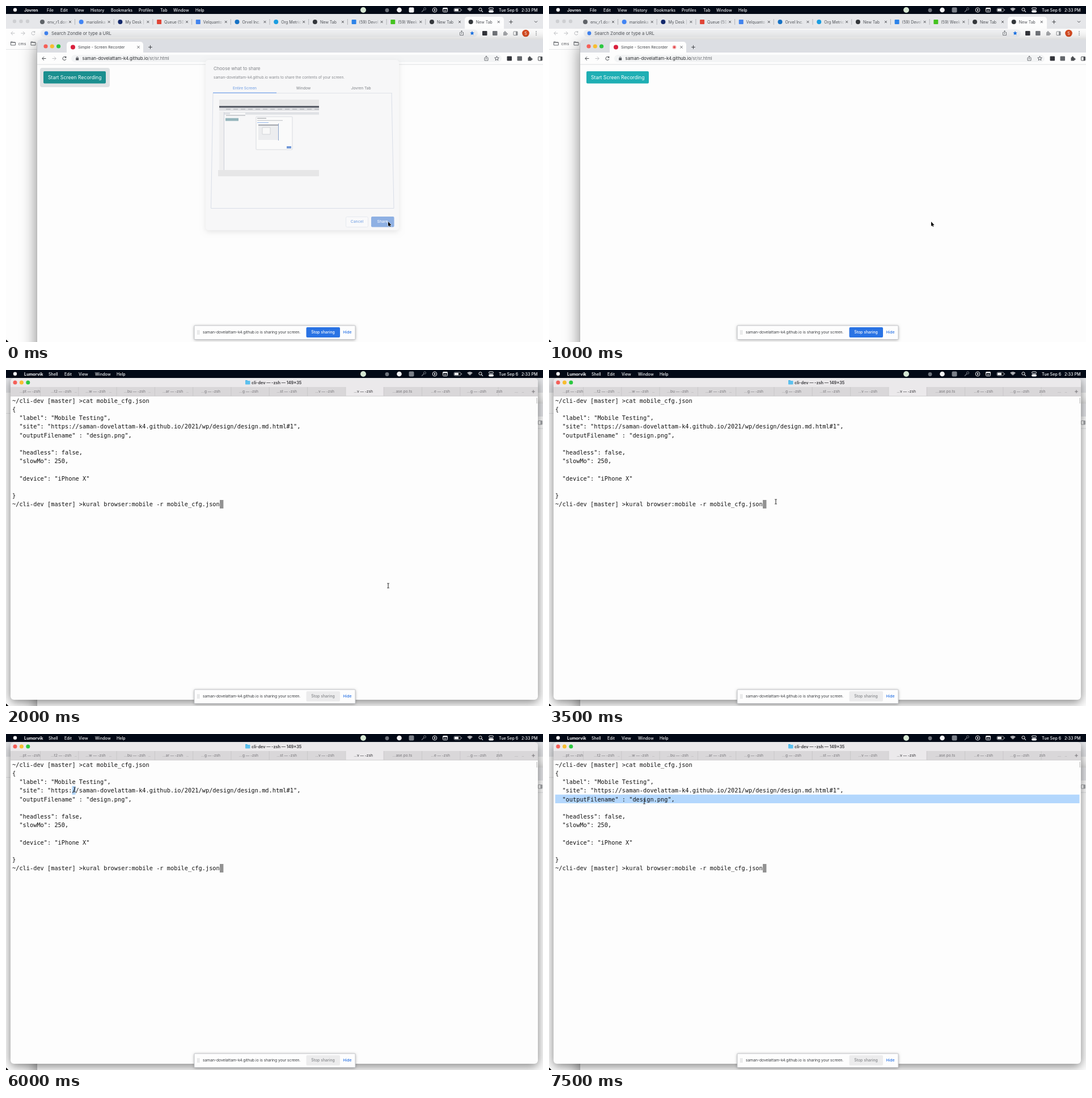
Recreate the animation shown at these times as an HTML page with a canvas. Size 947 by 592 pixels, loop 8000 ms.

```html
<!DOCTYPE html>
<html lang="en">
<head>
<meta charset="utf-8">
<title>Screen share</title>
<style>
html, body { margin: 0; width: 100%; height: 100%; overflow: hidden; background: #fdfdfd; }
canvas { display: block; width: 947px; height: 592px; }
</style>
</head>
<body>
<canvas id="stage"></canvas>
<script>
const W = 947, H = 592, LOOP = 8000, STEP = 500;
const UI = 'Inter, Roboto, sans-serif';
const MONO = '"DejaVu Sans Mono", "Liberation Mono", monospace';
const HOST = 'saman-dovelattam-k4.github.io';
const canvas = document.getElementById('stage');
const c = canvas.getContext('2d');
const dpr = window.devicePixelRatio || 1;
canvas.width = W * dpr;
canvas.height = H * dpr;

function box(x, y, w, h, fill, r = 0, stroke) {
  c.beginPath();
  c.roundRect(x, y, w, h, r);
  if (fill) { c.fillStyle = fill; c.fill(); }
  if (stroke) { c.strokeStyle = stroke; c.lineWidth = 1; c.stroke(); }
}
function dot(x, y, r, fill) {
  c.beginPath();
  c.arc(x, y, r, 0, Math.PI * 2);
  c.fillStyle = fill;
  c.fill();
}
function line(points, color, w = 1) {
  c.beginPath();
  for (let i = 0; i < points.length; i += 2) c.lineTo(points[i], points[i + 1]);
  c.strokeStyle = color;
  c.lineWidth = w;
  c.stroke();
}
function arc(x, y, r, a, b, color, w = 1) {
  c.beginPath();
  c.arc(x, y, r, a, b);
  c.strokeStyle = color;
  c.lineWidth = w;
  c.stroke();
}
// y is the vertical middle of the capitals
function text(s, x, y, size, color, weight = 400, align = 'left', family = UI) {
  c.font = `${weight} ${size}px ${family}`;
  c.textAlign = align;
  c.fillStyle = color;
  c.fillText(s, x, y + size * 0.36);
  return c.measureText(s).width;
}
function shadowed(blur, dy, color, draw) {
  c.save();
  c.shadowBlur = blur * dpr;
  c.shadowOffsetY = dy * dpr;
  c.shadowColor = color;
  draw();
  c.restore();
}

function cross(x, y, color = '#44474b') {
  line([x - 2, y - 2, x + 2, y + 2], color, 0.9);
  line([x + 2, y - 2, x - 2, y + 2], color, 0.9);
}
function plus(x, y, color = '#44474b', r = 3.3) {
  line([x - r, y, x + r, y], color, 1);
  line([x, y - r, x, y + r], color, 1);
}
function folder(x, y, color) {
  line([x - 4, y + 3, x - 4, y - 3, x - 1, y - 3, x, y - 2, x + 4, y - 2, x + 4, y + 3, x - 4, y + 3], color, 1);
  line([x - 4, y - 1.7, x + 4, y - 1.7], color, 1);
}
function star(x, y, color, solid) {
  c.beginPath();
  for (let i = 0; i < 10; i++) {
    const a = -Math.PI / 2 + i * Math.PI / 5, r = i % 2 ? 1.8 : 4;
    c.lineTo(x + r * Math.cos(a), y + r * Math.sin(a));
  }
  c.closePath();
  c.lineWidth = 0.9;
  c.fillStyle = c.strokeStyle = color;
  solid ? c.fill() : c.stroke();
}
function upload(x, y, color) {
  line([x - 1.5, y - 1, x - 3, y - 1, x - 3, y + 4, x + 3, y + 4, x + 3, y - 1, x + 1.5, y - 1], color, 0.8);
  line([x, y + 2, x, y - 4], color, 0.8);
  line([x - 1.6, y - 2.4, x, y - 4, x + 1.6, y - 2.4], color, 0.8);
}
function puzzle(x, y, color) {
  box(x - 3.5, y - 2, 6, 6, color, 0.6);
  dot(x - 0.5, y - 2.5, 1.5, color);
  dot(x + 3, y + 1, 1.5, color);
}
function panel(x, y, color) {
  box(x - 3.5, y - 3, 7, 6.5, null, 0.5, color);
  box(x + 0.5, y - 3, 3, 6.5, color);
}
function navArrows(x, y, back, next) {
  line([x + 3.5, y, x - 3.2, y], back, 1);
  line([x, y - 3.2, x - 3.2, y, x, y + 3.2], back, 1);
  line([x + 14.5, y, x + 21.2, y], next, 1);
  line([x + 18, y - 3.2, x + 21.2, y, x + 18, y + 3.2], next, 1);
  arc(x + 36, y, 3, 0.3, 5.4, back, 1);
  box(x + 37, y - 3.5, 2.4, 2.4, back);
}

const MENUS = {
  browser: [['Jovren', 32], ['File', 72], ['Edit', 96], ['View', 121], ['History', 149], ['Bookmarks', 185],
    ['Profiles', 234], ['Tab', 272], ['Window', 295], ['Help', 334]],
  shell: [['Lumorvik', 32], ['Shell', 75], ['Edit', 103], ['View', 128], ['Window', 157], ['Help', 195]]
};
function menuBar(kind, bright) {
  const w = '#f4f4f6';
  box(0, 0, W, 14, '#020916');
  dot(16, 6.8, 3.2, w);
  MENUS[kind].forEach(([s, x], i) => text(s, x, 7, i ? 7.1 : 7.3, w, i ? 500 : 700));
  dot(630, 7, 5, '#d5e6d3');
  dot(672, 7.5, 3.4, '#6d727b');
  dot(693.5, 7, 4.3, w);
  box(710.5, 2.5, 9, 9, bright ? w : '#7b8089', 2);
  arc(738.5, 5, 2, 0, 7, '#70757e', 1);
  line([737, 6.5, 733, 10.5], '#70757e', 1.2);
  arc(756, 7, 3.8, 0, 7, w, 1);
  c.beginPath(); c.moveTo(755, 5); c.lineTo(758, 7); c.lineTo(755, 9); c.fillStyle = w; c.fill();
  box(770.5, 3.5, 8, 7, null, 1, w);
  box(770.5, 3.5, 8, 2, w);
  line([772, 8, 777, 8], w, 1);
  box(790, 4, 12, 6, null, 1.7, '#9a9da3');
  box(791, 5, 7, 4, w, 0.8);
  box(803, 6, 1, 2, '#9a9da3');
  for (const r of [2.2, 4.3, 6.4]) arc(818, 10.2, r, -2.3, -0.84, w, 1.3);
  arc(836.5, 6.2, 2.6, 0, 7, w, 1);
  line([838.5, 8.2, 841, 10.7], w, 1.1);
  box(851.5, 3, 8, 3.2, null, 1.6, w);
  box(851, 7.5, 9, 4, w, 2);
  text('Tue Sep 6\u2002 2:33 PM', 869, 7, 7.2, w, 500);
}

const TABS = [['env_r1.dom', '#5f6368'], ['mariolinka', '#4285f4'], ['My Desk |', '#13286b'], ['Queue (50)', '#e04436', 1],
  ['Velquanto', '#4384ee', 1], ['Orvel Inc.', '#1672c4'], ['Org Metrics', '#1a9de0'], ['New Tab', '#34373b'],
  ['(59) Devel', '#2d83e8', 1], ['(59) Week', '#45c321', 1], ['New Tab', '#34373b'], ['New Tab', '#34373b']];
function fadeText(s, x, y) {
  const g = c.createLinearGradient(x + 25, 0, x + 37, 0);
  g.addColorStop(0, '#505358');
  g.addColorStop(1, '#50535800');
  text(s, x, y, 7, s === 'New Tab' ? '#505358' : g);
}
function backWindow() {
  const grey = '#63666b', pale = '#bcbec1';
  box(0, 14, W, H - 14, '#fdfdfd');
  box(0, 14, W, 26, '#e6e7ea');
  for (const x of [15, 26.5, 38]) dot(x, 27, 3.2, '#cecfd2');
  box(809, 19, 69, 22, '#fdfdfd', [5, 5, 0, 0]);
  TABS.forEach(([s, color, square], i) => {
    const x = 64 + i * 68.7;
    square ? box(x - 4, 24, 8, 8, color, 1) : dot(x, 28, 4, color);
    fadeText(s, x + 9, 28);
    cross(x + 49, 28);
    if (i < 10) line([x + 57.5, 23, x + 57.5, 33], '#a5a8ad', 0.8);
  });
  plus(890.5, 28);
  line([932, 26.5, 934.5, 29, 937, 26.5], '#44474b', 1);
  navArrows(12, 48, pale, pale);
  box(61, 41.5, 771, 13, '#f1f2f4', 6.5);
  dot(71, 48, 3.4, '#4285f4');
  text('Search Zondle or type a URL', 80, 48, 7.8, '#505358');
  upload(803.5, 47.5, grey);
  star(822, 48, '#1a73e8', true);
  box(840, 44, 8.5, 8, '#33343a', 1);
  box(858, 44, 8.5, 8, '#72757a', 1);
  puzzle(880.5, 48, '#a5a7aa');
  panel(898.5, 48, '#8f9296');
  dot(916.5, 48, 6.3, '#d64a20');
  text('S', 916.5, 48, 7, '#fff', 400, 'center');
  for (const y of [45, 48, 51]) dot(935, y, 0.8, grey);
  folder(12.5, 66, '#63666b');
  text('cms', 21.5, 66, 7, '#505358');
  folder(48, 66, '#63666b');
  line([0, 76.5, 55, 76.5], '#e3e4e6', 1);
}

function frontWindow(active, recording) {
  const ink = active ? '#4a4d51' : '#a3a5a8';
  shadowed(28, 9, 'rgba(0,0,0,.5)', () => box(55, 59, 920, 560, '#fdfdfd', 6));
  box(55, 59, 920, 24, active ? '#dcdee3' : '#e5e6e9', [6, 0, 0, 0]);
  line([54.5, 65, 54.5, H], '#b4b5b7', 0.8);
  ['#f55f58', '#f8bd30', '#2cc840'].forEach((color, i) => dot(70 + i * 11.3, 71, 3.6, color));
  box(107, 63, 135, 20, '#fdfdfd', [5, 5, 0, 0]);
  dot(118, 72.5, 4, '#d9203c');
  text('Simple - Screen Recorder', 127, 72.5, 6.8, '#42454a');
  if (recording) {
    dot(221, 72.5, 3.6, '#f6b9ba');
    dot(221, 72.5, 2, '#e2494b');
  }
  cross(233.5, 72.5);
  plus(254.5, 72.5);
  box(55, 82, 892, 21, '#fdfdfd');
  navArrows(67, 92.5, ink, active ? '#bcbec1' : '#a3a5a8');
  box(115, 86, 759, 13, '#f3f4f5', 6.5);
  box(123.2, 91.5, 5, 4, '#505358', 0.6);
  arc(125.7, 91.3, 1.6, Math.PI, 0, '#505358', 0.9);
  const w = text(HOST, 134.5, 92.5, 7.85, '#26282b');
  text('/sr/sr.html', 134.5 + w, 92.5, 7.85, '#6a6d72');
  upload(847, 92, '#505358');
  star(865.5, 92.5, '#505358');
  box(883.5, 88.5, 8.5, 8, '#33343a', 1);
  box(901.5, 88.5, 8.5, 8, '#63666b', 1);
  puzzle(924, 92.5, ink);
  panel(942, 92.5, ink);
  line([55, 103, W, 103], '#dcdee0', 1);
  if (!recording) box(60, 109, 123, 34, '#dfe2e4', 4);
  box(66, 115, 110, 21.5, recording ? '#1fafb4' : '#1b8f8f', 2);
  text('Start Screen Recording', 74, 126, 8.65, '#f7ffff');
}

function thumbnail() {
  box(376, 165, 176, 11, '#e7e7e8');
  box(376, 176, 176, 124, '#f7f7f8');
  box(376, 176, 176, 3.5, '#5a5e68');
  box(376, 179.5, 176, 5, '#dfe0e3');
  for (let x = 388; x < 545; x += 13) box(x, 181, 8, 1.5, '#b6b8bd');
  box(376, 186, 9, 103, '#efeff0');
  line([384.5, 187, 384.5, 289], '#ccd0da', 1);
  box(385, 187, 167, 4.5, '#dfe1e5');
  box(395, 188, 27, 3, '#f8f8f8');
  box(388, 192, 34, 1.5, '#c3c5c9');
  box(387, 197.5, 23, 5, '#94b5bb');
  box(441, 195, 64, 58, '#fafafa', 1, '#d9dbe0');
  box(443, 197, 16, 1.5, '#b3b5b9');
  box(443, 201, 45, 1.2, '#c7c9cd');
  box(443, 205, 20, 1, '#94b6ea');
  box(445, 208, 35, 28, '#ecedef');
  box(445, 209, 35, 1.5, '#8f929a');
  box(452, 214, 14, 12, '#f8f8f8', 0, '#d2d4d8');
  line([480.5, 207, 480.5, 237], '#8ba4cc', 1);
  box(495, 247, 8, 4, '#7399d8');
  box(374, 289, 178, 11, '#e6e6e7');
}
function shareDialog() {
  const blue = '#7fa8e6', grey = '#8d9095';
  shadowed(10, 3, 'rgba(0,0,0,.09)', () => box(352, 95, 341, 300, '#f7f7f8', 5));
  text('Choose what to share', 366, 110.5, 8, '#808388');
  text(HOST + ' wants to share the contents of your screen.', 366, 126, 6.5, '#85888d');
  text('Entire Screen', 421, 145, 6.6, blue, 500, 'center');
  text('Window', 524.5, 145, 6.6, grey, 500, 'center');
  text('Jovren Tab', 626, 145, 6.6, grey, 500, 'center');
  line([365, 153.5, 681, 153.5], '#dfe2e8', 1);
  line([365, 153, 477, 153], '#8ab1ec', 1.5);
  line([365, 154, 361.5, 356.5, 684, 356.5, 680, 154], '#d9dee8', 1);
  thumbnail();
  box(599.5, 371.5, 39, 18, '#f9f9fa', 2, '#e6e9ef');
  text('Cancel', 619, 380, 6.8, blue, 500, 'center');
  box(644, 371, 40.5, 18.5, '#8eb0e3', 2);
  text('Share', 664, 380, 6.8, '#f5f8fd', 500, 'center');
}

function shareBar(active) {
  shadowed(5, 1, 'rgba(0,0,0,.35)', () => box(332, 563, 284, 24.5, '#fdfdfd', 1));
  box(332, 563, 284, 24.5, null, 1, '#c3c5c9');
  for (let i = 0; i < 8; i++) dot(338 + (i % 2) * 2.4, 572 + (i >> 1) * 2, 0.6, '#9a9da1');
  text(HOST + ' is sharing your screen.', 347, 575, 6.7, '#36393d');
  box(529.5, 566, 59.5, 18, active ? '#2a73e4' : '#ececed', 2);
  text('Stop sharing', 559, 575, 6.9, active ? '#fff' : '#85878a', 500, 'center');
  text('Hide', 594.5, 575, 6.8, '#2a73e4', 500);
}

// tile colour, inner shape colour, inner shape kind, radius
const ICONS = [['#fcfcfc', '#e04a3c', 'circle'], ['#fcfcfc', '#36c5f0', 'square'], ['#101214'], ['#fcfcfc', '#2586cf', 'square'],
  [null, '#8fb9a0', 'circle', 31], ['#2f94ee'], ['#0c0d0f'], ['#30a0f2'], [null, '#f4702c', 'circle', 31],
  ['#20d74a'], ['#f5f4ef'], ['#1587e2']];
function badge(s, x, y, w) {
  box(x - w / 2, y - 13, w, 26, '#e23b41', 13);
  text(s, x, y, 13, '#fff', 400, 'center');
}
function switcher() {
  box(11.5, 244, 923, 104.5, 'rgba(226,227,228,.96)', 13);
  box(172.5, 257.5, 76.5, 76.5, '#c0c1c4', 5);
  ICONS.forEach(([tile, mark, kind, r = 25], i) => {
    const x = 61 + i * 74.95, y = 296.5;
    if (tile) shadowed(3, 1, 'rgba(0,0,0,.3)', () => box(x - 29, y - 29, 58, 58, tile, 13));
    if (kind === 'circle') dot(x, y, r, mark);
    if (kind === 'square') box(x - 20, y - 20, 40, 40, mark);
  });
  badge('2,715', 600, 273.5, 42);
  badge('17', 832, 273.5, 28);
  text('Lumorvik', 210.5, 342, 7.6, '#85878a', 400, 'center');
}

const LINES = ['~/cli-dev [master] >cat mobile_cfg.json', '{', '  "label": "Mobile Testing",',
  `  "site": "https://${HOST}/2021/wp/design/design.md.html#1",`, '  "outputFilename" : "design.png",', '',
  '  "headless": false,', '  "slowMo": 250,', '', '  "device": "iPhone X"', '', '}',
  '~/cli-dev [master] >kural browser:mobile -r mobile_cfg.json'];
const SHELLS = [['pt', 42], ['t2', 97, 1], ['w', 158, 1], ['bu', 227, 1], ['ar', 294, 1], ['g', 361], ['g', 428],
  ['st', 495], ['v', 562], ['v', 630], ['', 699], ['e', 766], ['g', 830]];
const CELL = 6.203, ROW = 15.21;

function shellWindow(t) {
  shadowed(18, 4, 'rgba(0,0,0,.5)', () => box(8, 14.5, 930, 566.5, '#fdfdfd', 6));
  box(8, 14.5, 930, 16, '#ebe9eb', [6, 6, 0, 0]);
  box(8, 30, 930, 16, '#d9d7d9');
  box(598.5, 30, 67.5, 16, '#ebe9eb');
  line([8, 46, 938, 46], '#c6c4c6', 0.8);
  for (let x = 60.5; x < 870; x += 67.3) line([x, 30, x, 46], '#c6c4c6', 0.8);
  ['#f55f58', '#f8bd30', '#2cc840'].forEach((color, i) => dot(16 + i * 11.4, 22, 3.5, color));
  box(422, 18, 4, 3, '#43aee0', 0.6);
  box(422, 19, 8.5, 6.5, '#5cc0ee', 0.8);
  text('cli-dev — -zsh — 149×35', 433, 22, 7.2, '#444347', 700);
  SHELLS.forEach(([s, x, more], i) => {
    const color = i === 9 ? '#444347' : '#838185';
    text(s ? `...${s} — -zsh` : '...ase.po.ts', x, 38, 6.5, color, 500, 'center');
    if (more) text('..', x + 24, 38, 6.5, color, 500);
  });
  text('zsh', 870, 38, 6.5, '#838185', 500, 'center');
  text('...', 900, 38, 6.5, '#838185', 500, 'center');
  text('..', 911.5, 38, 6.5, '#838185', 500, 'center');
  plus(930, 38, '#747276', 2.8);
  box(935.5, 49, 1.5, 10, '#c9c9c9');

  const pick = selection(t);
  if (pick) {
    const [row, col] = pick, y = 54 + row * ROW - 8;
    box(col < 0 ? 11 : 11 + col * CELL, y, col < 0 ? 924.5 : CELL, ROW, '#b3d7fd');
  }
  box(377, 229, 6.4, 15, '#929292');
  LINES.forEach((s, i) => text(s, 11, 54 + i * ROW, 10.303, '#111', 400, 'left', MONO));
}
// [row, column], column -1 takes the whole row
function selection(t) {
  if (t < 5000) return null;
  if (t < 5500) return [2, 18];
  if (t < 6000) return [2, -1];
  if (t < 6500) return [3, 17];
  if (t < 7500) return [3, -1];
  return [4, -1];
}

const PATH = [[0, 674, 380], [2500, 674, 380], [4500, 126, 84], [5000, 124, 81], [5500, 124, 82], [6000, 121, 98],
  [6500, 121, 98], [7500, 168, 119]];
function pointer(t) {
  const i = PATH.findIndex(p => p[0] > t);
  if (i < 0) return PATH[PATH.length - 1].slice(1);
  const [t0, x0, y0] = PATH[i - 1], [t1, x1, y1] = PATH[i];
  const u = (t - t0) / (t1 - t0), e = u * u * (3 - 2 * u);
  return [x0 + (x1 - x0) * e, y0 + (y1 - y0) * e];
}
function shape(points, x, y, fill, edge) {
  c.beginPath();
  for (let i = 0; i < points.length; i += 2) c.lineTo(x + points[i], y + points[i + 1]);
  c.closePath();
  c.lineWidth = 1;
  c.lineJoin = 'round';
  c.strokeStyle = edge;
  c.stroke();
  c.fillStyle = fill;
  c.fill();
}
function drawPointer(kind, x, y) {
  if (kind === 'arrow') shape([0, 0, 0, 8, 1.8, 6.4, 3, 9, 4.2, 8.5, 3.1, 6, 5.5, 6], x, y, '#000', '#fff');
  if (kind === 'hand') shape([-1, 0, 0, 0, 1, 3, 4, 3.5, 5, 5, 4, 9, 0, 9, -3, 5.5, -2, 5, 0, 6], x, y, '#fff', '#222');
  if (kind === 'beam') {
    line([x, y - 4, x, y + 4], '#222', 1);
    line([x - 2, y - 4, x + 2, y - 4], '#222', 0.8);
    line([x - 2, y + 4, x + 2, y + 4], '#222', 0.8);
  }
}

function render(t) {
  const shell = t >= 2000, switching = t >= 1500 && !shell;
  c.setTransform(dpr, 0, 0, dpr, 0, 0);
  backWindow();
  frontWindow(t < 1500, t >= 1000);
  if (t < 500) shareDialog();
  if (shell) shellWindow(t);
  shareBar(!shell);
  if (switching) switcher();
  shape([0, 588, 0, 592, 4, 592], 0, 0, '#111', '#111');
  menuBar(shell ? 'shell' : 'browser', t < 500);
  const [x, y] = pointer(t);
  drawPointer(shell ? 'beam' : switching ? 'hand' : 'arrow', x, y);
}

const start = performance.now();
function tick() {
  const t = (performance.now() - start) % LOOP;
  render(Math.floor(t / STEP) * STEP);
  requestAnimationFrame(tick);
}
tick();
</script>
</body>
</html>
```
